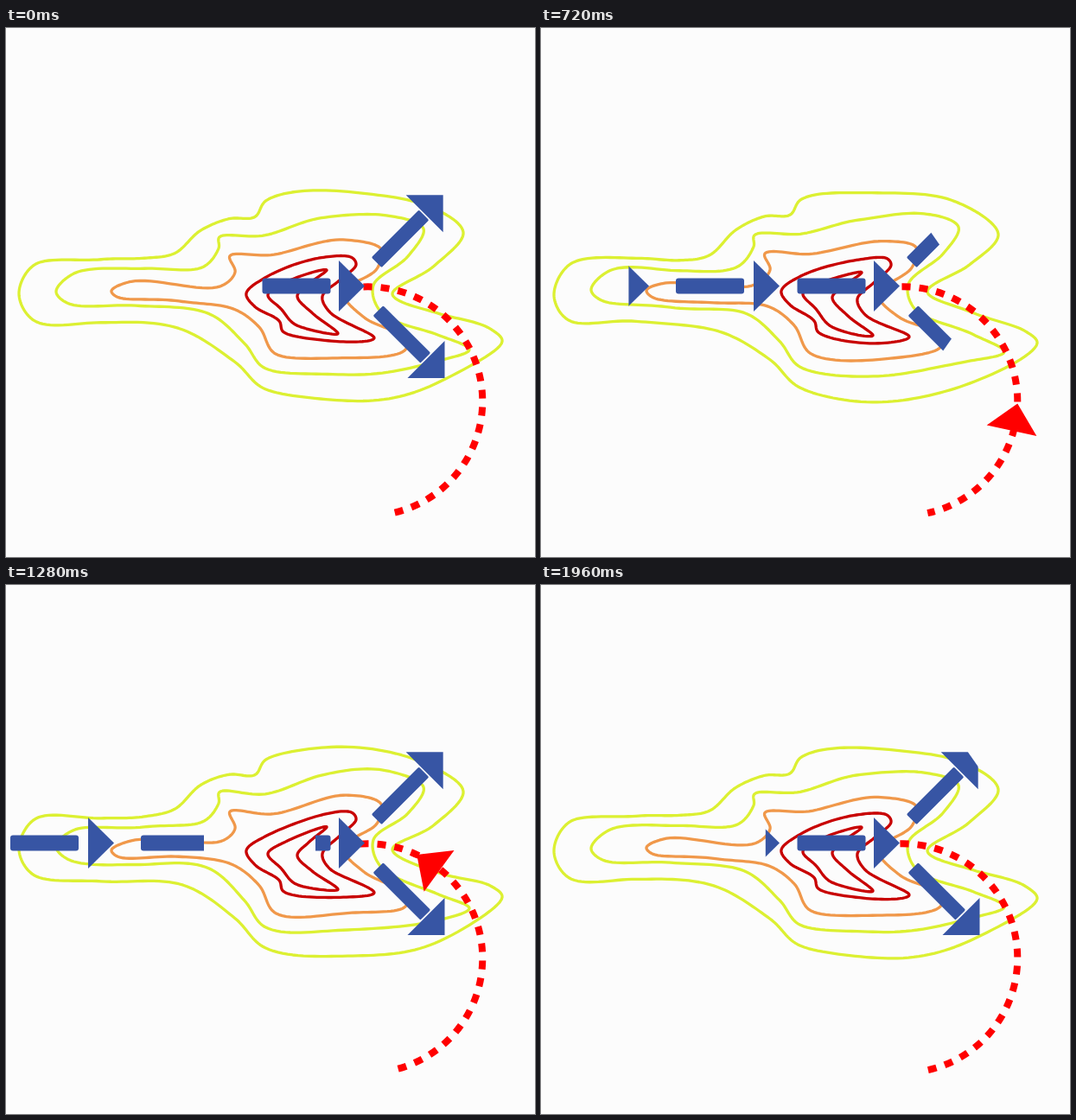
An HTML page with a canvas for the animation above (2000 ms loop, 612 by 612 pixels).

```html
<!DOCTYPE html>
<html lang="en">
<head>
<meta charset="utf-8">
<title>Flow contours</title>
<style>
  html, body { margin: 0; width: 100%; height: 100%; overflow: hidden; background: #fcfcfc; }
  canvas { display: block; width: 612px; height: 612px; }
</style>
</head>
<body>
<canvas id="stage" width="612" height="612"></canvas>
<script>
const SIZE = 612, LOOP = 2000, STEP = 40, CYCLE = 1000;
const ctx = document.getElementById('stage').getContext('2d');
const YELLOW = '#dcf032', ORANGE = '#f0984a', CRIMSON = '#c80000';
const BLUE = '#3755a4', RED = '#ff0000';
const rad = deg => deg * Math.PI / 180;

// Closed centripetal Catmull-Rom curve through a few "x,y" key points
function curve(keys) {
  const pts = keys.split(' ').map(key => key.split(',').map(Number));
  const n = pts.length, out = [];
  const mix = (a, b, ta, tb, t) =>
    [0, 1].map(i => (a[i] * (tb - t) + b[i] * (t - ta)) / (tb - ta));
  for (let i = 0; i < n; i++) {
    const p = [-1, 0, 1, 2].map(o => pts[(i + o + n) % n]);
    const k = [0];
    for (let j = 0; j < 3; j++) {
      k.push(k[j] + Math.sqrt(Math.hypot(p[j + 1][0] - p[j][0], p[j + 1][1] - p[j][1])));
    }
    for (let s = 0; s < 16; s++) {
      const t = k[1] + (k[2] - k[1]) * s / 16;
      const [a, b, c] = [0, 1, 2].map(j => mix(p[j], p[j + 1], k[j], k[j + 1], t));
      out.push(mix(mix(a, b, k[0], k[2], t), mix(b, c, k[1], k[3], t), k[1], k[2], t));
    }
  }
  return out;
}

const contours = [
  { color: YELLOW, points: curve('15,307 34,272 110,268 160,268 195,261 225,233 258,219 288,218 ' +
    '301,200 370,189 475,201 529,238 495,276 447,306 500,331 560,349 574,363 490,415 395,431 ' +
    '300,418 265,385 205,349 110,341 32,337') },
  { color: YELLOW, points: curve('58,303 80,282 160,280 228,275 246,253 247,240 300,240 365,221 ' +
    '440,215 483,232 465,263 425,296 434,327 500,356 536,374 490,388 390,401 300,394 276,364 ' +
    '235,329 150,323 72,317') },
  { color: ORANGE, points: curve('122,305 145,295 248,297 265,281 259,262 310,263 390,245 434,254 ' +
    '429,277 390,306 415,334 463,357 462,371 400,381 312,378 293,346 262,323 200,316 130,313') },
  { color: CRIMSON, points: curve('278,306 302,288 365,267 400,265 405,273 386,292 366,312 375,330 ' +
    '426,357 380,363 321,353 316,340 288,322') },
  { color: CRIMSON, points: curve('303,309 325,295 371,281 350,298 337,312 355,332 384,354 335,345 318,326') }
];

function polygon(points) {
  ctx.beginPath();
  points.forEach(([x, y]) => ctx.lineTo(x, y));
  ctx.closePath();
}

function fillPolygon(points) {
  polygon(points);
  ctx.fill();
}

// A small vertical wave runs to the right through every contour
function drawContours(t) {
  const wave = x => 1.8 * Math.cos(2 * Math.PI * ((x - 58) / 190 - t / CYCLE));
  ctx.lineJoin = 'round';
  ctx.lineWidth = 3.3;
  for (const { points, color } of contours) {
    polygon(points.map(([x, y]) => [x, y + wave(x)]));
    ctx.strokeStyle = color;
    ctx.stroke();
  }
}

// Dashed arc with a head whose tip rides along it
const arc = { x: 418.8, y: 431.8, r: 132.5, from: rad(77.6), to: rad(-97.5) };

function drawArc(t) {
  ctx.strokeStyle = ctx.fillStyle = RED;
  ctx.lineWidth = 8;
  ctx.setLineDash([10, 10]);
  ctx.lineDashOffset = -(2.6 + t * 0.05);
  ctx.beginPath();
  ctx.arc(arc.x, arc.y, arc.r, arc.from, arc.to, true);
  ctx.stroke();
  ctx.setLineDash([]);

  const angle = rad(86 - 0.1178 * t);
  ctx.save();
  ctx.translate(arc.x, arc.y);
  ctx.beginPath();
  ctx.moveTo(0, 0);
  ctx.arc(0, 0, 300, arc.from, arc.to, true);
  ctx.clip();
  ctx.rotate(angle);
  ctx.translate(arc.r, 0);
  ctx.rotate(rad(11 - 90));
  fillPolygon([[0, 0], [-32, -29.5], [-32, 29.5]]);
  ctx.restore();
}

// Blue arrows: one wipe draws them, a slowing one erases them later
const drawEdge = p => 5 + 0.8 * p;
const eraseEdge = p => Math.min(75 + 0.66 * (p - 680), 318 + 0.25 * (p - 1120));

function drawMain(p) {
  const front = drawEdge(p), back = eraseEdge(p), old = eraseEdge(p + CYCLE);
  ctx.save();
  ctx.beginPath();
  ctx.rect(back, 0, Math.max(0, front - back), SIZE);
  if (old > front) ctx.rect(old, 0, SIZE, SIZE);
  ctx.clip();
  for (const x of [5, 156, 296.5]) {
    ctx.beginPath();
    ctx.roundRect(x, 289.5, 79, 18, 3);
    ctx.fill();
  }
  for (const x of [95, 246, 385]) fillPolygon([[x, 269], [x + 30, 298.5], [x, 328]]);
  ctx.restore();
}

// A diagonal arm; dir is -1 for up and 1 for down, (x, y) the middle of its foot
function drawArm(p, dir, x, y, duration) {
  ctx.save();
  ctx.translate(x, y);
  ctx.scale(1, dir);
  if (p >= 520) {
    const edge = -2 + 134 * Math.min(1, Math.max(0, (p - 560) / duration));
    const slant = 0.7;
    polygon([[edge + slant * SIZE, -SIZE], [edge - slant * SIZE, SIZE],
      [-2 * SIZE, SIZE], [-2 * SIZE, -SIZE]]);
    ctx.clip();
  }
  fillPolygon([[77, 35], [77, 78], [34, 78]]);
  ctx.rotate(rad(45));
  ctx.beginPath();
  ctx.roundRect(0, -8.3, 77.5, 16.6, 1.5);
  ctx.fill();
  ctx.restore();
}

function draw(t) {
  const p = t % CYCLE;
  ctx.fillStyle = '#fcfcfc';
  ctx.fillRect(0, 0, SIZE, SIZE);
  drawContours(t);
  drawArc(t);
  ctx.fillStyle = BLUE;
  drawMain(p);
  drawArm(p, -1, 428.7, 271.2, 440);
  drawArm(p, 1, 430.5, 327, 310);
}

const start = performance.now();
function tick() {
  const t = (performance.now() - start) % LOOP;
  draw(Math.floor(t / STEP) * STEP);
  requestAnimationFrame(tick);
}
tick();
</script>
</body>
</html>
```
